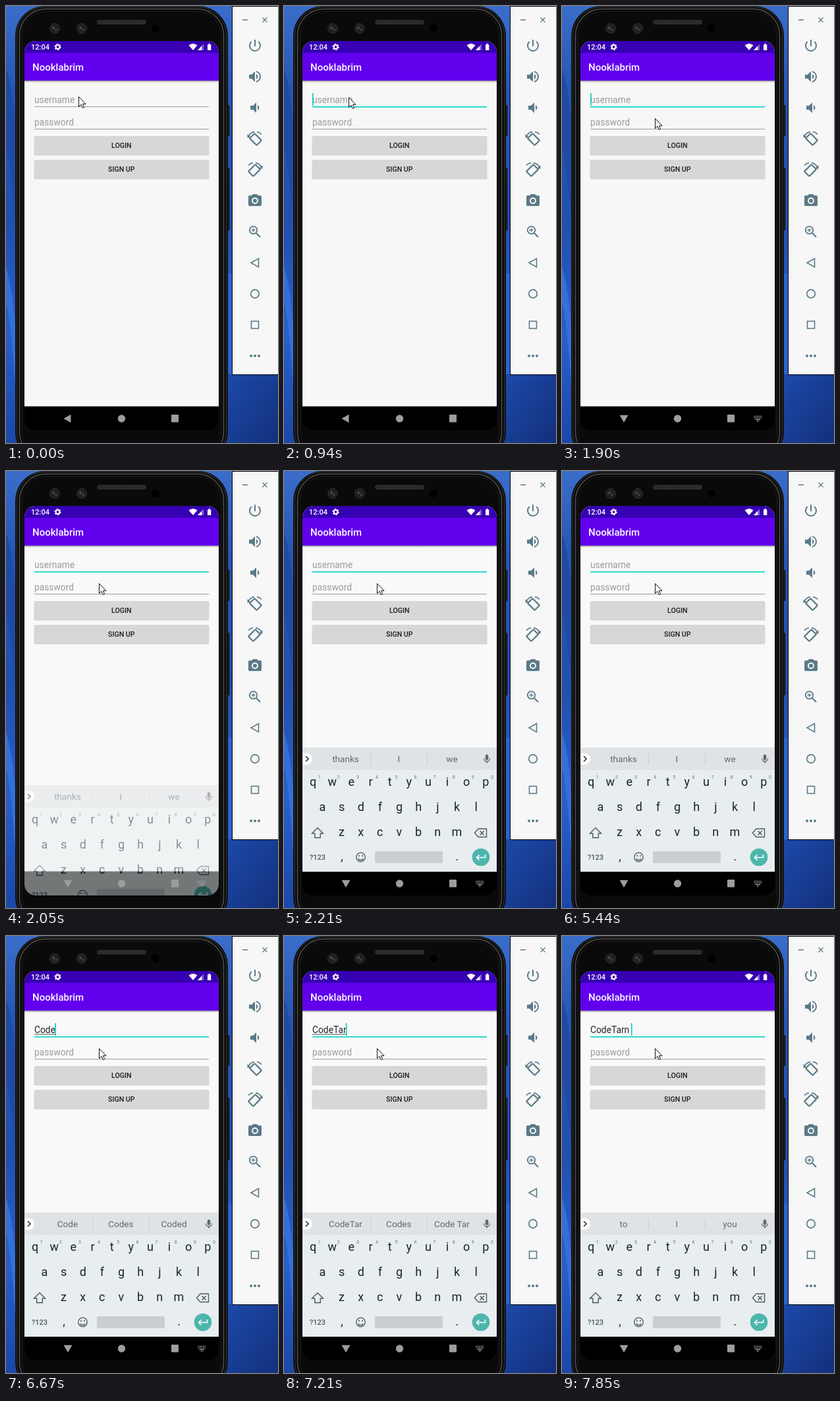
An HTML page for the animation above (8000 ms loop, 413 by 662 pixels).

```html
<!DOCTYPE html>
<html lang="en">
<head>
<meta charset="utf-8">
<title>Login screen</title>
<style>
html, body { margin: 0; width: 100%; height: 100%; overflow: hidden; background: #1c4aa8; }
svg { display: block; width: 413px; height: 662px; }
text { font-family: Roboto, Arial, sans-serif; white-space: pre; }
.mid { text-anchor: middle; }
.hint { font-size: 13.8px; fill: #9b9b9b; }
.btn { font-size: 10.6px; font-weight: 500; fill: #1c1c1c; text-anchor: middle; }
.key { font-size: 18px; fill: #14262e; text-anchor: middle; }
.num { font-size: 7px; fill: #6a777d; text-anchor: middle; }
.tip { font-size: 13.6px; fill: #5d696f; text-anchor: middle; }
.line { fill: none; stroke: #5b7a88; stroke-width: 2; }
</style>
</head>
<body>
<svg viewBox="0 0 413 662">
  <defs>
    <linearGradient id="sky" x1="0" y1="0" x2="0" y2="1">
      <stop offset="0" stop-color="#3a6dca"/><stop offset=".2" stop-color="#2755b0"/>
      <stop offset=".5" stop-color="#2250ae"/><stop offset=".75" stop-color="#295fca"/>
      <stop offset="1" stop-color="#1b48a8"/>
    </linearGradient>
    <linearGradient id="corner" x1="0" y1="0" x2="1" y2="1">
      <stop offset="0" stop-color="#1d4aa9"/><stop offset="1" stop-color="#132f7c"/>
    </linearGradient>
    <linearGradient id="drop" x1="0" y1="0" x2="0" y2="1">
      <stop offset="0" stop-color="#000" stop-opacity=".4"/><stop offset="1" stop-color="#000" stop-opacity="0"/>
    </linearGradient>
    <pattern id="mesh" width="3" height="3" patternUnits="userSpaceOnUse">
      <rect width="3" height="3" fill="#303030"/><circle cx="1.5" cy="1.5" r=".8" fill="#161616"/>
    </pattern>
    <clipPath id="screen"><rect x="28" y="53" width="295" height="590" rx="17"/></clipPath>
  </defs>

  <rect width="413" height="662" fill="url(#sky)"/>
  <path d="M0 95Q10 120 15 190V330Q8 250 0 215Z" fill="#1f4ba4"/>
  <path d="M0 395Q11 430 15 500V590Q8 480 0 450Z" fill="#356fd9"/>
  <rect x="336" y="405" width="8" height="154" fill="#2c63cf"/>
  <rect x="336" y="558" width="77" height="104" fill="url(#corner)"/>

  <g id="phone">
    <rect x="335" y="150" width="4.5" height="47" rx="1.5" fill="#1a1a1a"/>
    <rect x="335" y="245" width="4.5" height="95" rx="1.5" fill="#1a1a1a"/>
    <rect x="14.5" y=".5" width="322" height="690" rx="44" fill="#0a0a0a" stroke="#161616"/>
    <rect x="16.5" y="1.5" width="318" height="687" rx="43" fill="none" stroke="#383838"/>
    <rect x="20.5" y="4.5" width="310" height="681" rx="40" fill="#0a0a0a" stroke="#505050" stroke-width="1.500"/>
    <rect x="24.5" y="8.5" width="302" height="673" rx="36" fill="#0a0a0a" stroke="#1c1c1c"/>
    <rect x="138" y="21" width="75" height="7" rx="3.5" fill="url(#mesh)"/>
    <g fill="#202020" stroke="#2c2c2c"><circle cx="74" cy="34" r="7.5"/><circle cx="115" cy="34" r="7.5"/></g>
    <g fill="#4a4a4a"><circle cx="72" cy="33" r="2"/><circle cx="76" cy="36" r="1.5"/><circle cx="113" cy="33" r="2"/><circle cx="117" cy="36" r="1.5"/></g>
    <circle cx="227" cy="34" r="6" fill="#000"/>
  </g>

  <g clip-path="url(#screen)">
    <rect id="page" x="28" y="53" width="295" height="554"/>
    <rect x="28" y="113" width="295" height="3" fill="url(#drop)"/>
    <rect x="28" y="53" width="295" height="18" fill="#3700b3"/>
    <rect x="28" y="71" width="295" height="42" fill="#6200ee"/>
    <text x="38" y="66" font-size="11" font-weight="500" fill="#fff">12:04</text>
    <g fill="none" stroke="#fff"><circle cx="78.5" cy="62" r="2.9" stroke-width="2"/><circle cx="78.5" cy="62" r="4.3" stroke-width="1.6" stroke-dasharray="2.2 2.3"/></g>
    <g fill="#fff">
      <path d="M277.500 59.500Q284 54.500 290.500 59.500L284 67Z"/>
      <path d="M291 67L300 57.500V67Z" opacity=".4"/><path d="M291 67L297 60.700V67Z"/>
      <path d="M306 58.500H307.500V57H309.800V58.500H311.300V67H306Z"/>
    </g>
    <text x="40" y="98" font-size="15" font-weight="500" fill="#fff">Nooklabrim</text>

    <text id="hint" class="hint" x="43" y="147">username</text>
    <text id="typed" x="43" y="147" font-size="13.8" fill="#242424"></text>
    <rect id="mark" x="43" y="148.500" height="1" fill="#555"/>
    <rect id="rule" x="43" width="265"/>
    <rect id="caret" y="132" width="1.600" height="19" fill="#03cdb9"/>
    <text class="hint" x="43" y="181">password</text>
    <rect x="43" y="186" width="265" height="1" fill="#9d9d9d"/>
    <g id="buttons"></g>

    <rect x="28" y="606.500" width="295" height="37" fill="#000"/>
    <g id="board"></g>
    <g fill="#9d9d9d">
      <path id="back" d="M87.500 625L98.500 618.700V631.300Z"/>
      <path id="down" d="M87.500 619.700H100.500L94 631Z"/>
      <circle cx="175.500" cy="625" r="5.700"/>
      <rect x="251" y="619" width="11" height="11.500" rx="1"/>
      <g id="switch"><path d="M291.500 621.500H303M291.500 624H303" stroke="#9d9d9d" stroke-width="1.500" stroke-dasharray="1.500 1"/><path d="M293.500 626.500H301" stroke="#9d9d9d" stroke-width="1.300"/><path d="M295.500 628.500H299L297.250 630.500Z"/></g>
    </g>
  </g>

  <rect x="343.500" y=".5" width="80" height="558" fill="#f7f7f7" stroke="#000"/>
  <g class="line">
    <path d="M359 21H367M389.500 17.500L396.500 24.500M396.500 17.500L389.500 24.500" stroke-width="1.300"/>
    <g id="turn">
      <rect x="-5.300" y="-7.500" width="10.600" height="15" rx="1" transform="translate(379 202) rotate(-45)" stroke-width="2.200"/>
      <path d="M368.500 197A11 11 0 0 1 377 190.700M381 190.700A11 11 0 0 1 388 194.500" stroke-width="1.700"/>
      <path d="M366.500 194V199.500H372Z" fill="#5b7a88" stroke="none"/>
    </g>
    <use href="#turn" transform="translate(756 47) scale(-1 1)"/>
    <circle cx="375.500" cy="339.500" r="5.700" stroke-width="1.800"/><path d="M380 344L386 350" stroke-width="2.200"/><path d="M372.500 339.500H378.500M375.500 336.500V342.500" stroke-width="1.300"/>
    <path d="M372 389L383.500 382.500V395.500Z" stroke-width="1.600"/>
    <circle cx="378" cy="436" r="6.300" stroke-width="1.700"/>
    <rect x="372.500" y="477.500" width="11" height="11" stroke-width="1.600"/>
  </g>
  <g id="icons" fill="#5b7a88" fill-rule="evenodd">
    <path transform="translate(366 48)" d="M13 3h-2v10h2zM17.830 5.170l-1.420 1.420A6.920 6.920 0 0 1 19 12a7 7 0 1 1-11.420-5.420L6.170 5.170A8.930 8.930 0 0 0 3 12a9 9 0 0 0 18 0c0-2.740-1.230-5.180-3.170-6.830z"/>
    <path transform="translate(366 95)" d="M3 9v6h4l5 5V4L7 9zM16.500 12A4.500 4.500 0 0 0 14 7.970v8.050A4.500 4.500 0 0 0 16.500 12zM14 3.230v2.060a7 7 0 0 1 0 13.420v2.060a9 9 0 0 0 0-17.540z"/>
    <path transform="translate(366 142)" d="M18.500 12A4.500 4.500 0 0 0 16 7.970v8.050A4.500 4.500 0 0 0 18.500 12zM5 9v6h4l5 5V4L9 9z"/>
    <path transform="translate(366 283)" d="M9 2L7.170 4H4a2 2 0 0 0-2 2v12a2 2 0 0 0 2 2h16a2 2 0 0 0 2-2V6a2 2 0 0 0-2-2h-3.170L15 2zM12 17a5 5 0 1 1 0-10 5 5 0 0 1 0 10z"/>
    <circle cx="378" cy="295" r="3"/>
    <circle cx="372" cy="530" r="2"/><circle cx="378" cy="530" r="2"/><circle cx="384" cy="530" r="2"/>
  </g>

  <path id="mouse" d="M.5 .5V15.500L4 12.200L6.300 17.500L8.700 16.500L6.400 11.400H11Z" fill="#fff" stroke="#111"/>
</svg>

<script>
const $ = id => document.getElementById(id);
const text = (cls, x, y, s) => `<text class="${cls}" x="${x}" y="${y}">${s}</text>`;

$('buttons').innerHTML = [['LOGIN', 197], ['SIGN UP', 233]].map(([s, y]) =>
  `<rect x="42.500" y="${y + 1}" width="266" height="28.500" rx="2" fill="#000" opacity=".14"/>
   <rect x="43" y="${y}" width="265" height="28" rx="1.500" fill="#d6d7d7"/>` + text('btn', 175.3, y + 18, s)).join('');

const rows = [['qwertyuiop', 44, 477], ['asdfghjkl', 58.5, 515], ['zxcvbnm', 87.5, 553]];
const keys = rows.map(([s, x, y]) => [...s].map((c, i) => text('key', x + i * 29.15, y, c)).join('')).join('');
const nums = [...'1234567890'].map((c, i) => text('num', 53.6 + i * 29.15, 465.5, c)).join('');

$('board').innerHTML = `
  <rect x="28" y="419" width="295" height="188" fill="#e8edf0"/>
  <rect x="28" y="419" width="295" height="34" fill="#dfe3e6"/>
  <path d="M28 427.500H34A8.500 8.500 0 0 1 34 445H28Z" fill="#fff"/>
  <path d="M33 432L37 436L33 440" fill="none" stroke="#333" stroke-width="1.700"/>
  <path d="M131.500 428V445M217.500 428V445" stroke="#c8cdd0"/>
  ${[93.5, 174.3, 255].map(x => text('tip', x, 441, '')).join('')}
  <rect x="305.700" y="429.500" width="4.600" height="8.500" rx="2.300" fill="#5d696f"/>
  <path d="M303.500 435.500A4.500 4.500 0 0 0 312.500 435.500M308 440V443" fill="none" stroke="#5d696f" stroke-width="1.300"/>
  ${keys}${nums}
  <path id="shift" d="M51 540.500L59.500 549H55.300V555.500H46.700V549H42.500Z" stroke="#4b5960" stroke-width="1.400"/>
  <path d="M295 542H307.500V554.500H295L289.500 548.300ZM297.500 545.200L303.700 551.400M303.700 545.200L297.500 551.400" fill="none" stroke="#4b5960" stroke-width="1.400"/>
  <text class="mid" x="51" y="589" font-size="11" font-weight="500" fill="#4b5960">?123</text>
  ${text('key', 88, 590, ',')}${text('key', 262.5, 590, '.')}
  <g fill="none" stroke="#4b5960" stroke-width="1.300"><circle cx="116.500" cy="585" r="6.800"/><path d="M112.800 587A4 4 0 0 0 120.200 587"/></g>
  <circle cx="114" cy="583" r="1.100" fill="#4b5960"/><circle cx="119" cy="583" r="1.100" fill="#4b5960"/>
  <rect x="138" y="576" width="103" height="18" rx="2" fill="#c9ced2"/>
  <circle cx="299" cy="585" r="13.300" fill="#4db6ac"/>
  <path d="M305.500 581V585.500H293M296.500 581.500L292.500 585.500L296.500 589.500" fill="none" stroke="#fff" stroke-width="1.600"/>`;

// Each step changes only the listed values.
const steps = [
  [0, { x: 110, y: 137, paper: '#f7f7f7', focus: 0, caret: 0, nav: 0, slide: 0, alpha: 0, caps: 0, word: '', mark: 0, tips: 'thanks,I,we' }],
  [400, { focus: 1 }],
  [520, { caret: 1 }],
  [670, { x: 107 }],
  [790, { x: 102, y: 138 }],
  [940, { x: 98 }],
  [1500, { x: 122, y: 155 }],
  [1620, { x: 141, y: 170 }],
  [1780, { caret: 0 }],
  [1900, { caret: 1, nav: 1 }],
  [2050, { caret: 0, slide: 57, alpha: .5, paper: '#f9f9f9' }],
  [2210, { slide: 0, alpha: 1 }],
  [2510, { caret: 1 }],
  [2910, { caret: 0 }],
  [3470, { caret: 1 }],
  [3900, { caret: 0 }],
  [4490, { caret: 1 }],
  [5050, { caret: 0 }],
  [5320, { caps: 1 }],
  [5440, { caps: 0 }],
  [5560, { caret: 1, word: 'Co', mark: 1, tips: 'Co,Come,Could' }],
  [5710, { word: 'Code', tips: 'Code,Codes,Coded' }],
  [6240, { caret: 0 }],
  [6670, { caret: 1 }],
  [6950, { caps: 1 }],
  [7070, { caps: 0, word: 'CodeT', tips: 'CodeT,Codes,Coded' }],
  [7210, { word: 'CodeTar', tips: 'CodeTar,Codes,Code Tar' }],
  [7580, { word: 'CodeTarn', tips: 'CodeTarn,Codes,Coding' }],
  [7730, { word: 'CodeTarn ', mark: 0 }],
  [7850, { tips: 'to,I,you' }]
];

const pen = document.createElement('canvas').getContext('2d');
const tips = document.querySelectorAll('.tip');
const letters = [...document.querySelectorAll('.key')].slice(0, 26);
const alphabet = rows.map(r => r[0]).join('');
const set = (id, attrs) => { for (const k in attrs) $(id).setAttribute(k, attrs[k]); };
const show = (id, on) => set(id, { opacity: on ? 1 : 0 });

function draw(s) {
  pen.font = '13.8px Roboto, Arial, sans-serif';
  const width = pen.measureText(s.word).width;
  set('mouse', { transform: `translate(${s.x} ${s.y})` });
  set('page', { fill: s.paper });
  set('rule', s.focus ? { y: 152, height: 1.6, fill: '#03d3bf' } : { y: 152, height: 1, fill: '#9d9d9d' });
  set('caret', { x: 43 + (s.word ? width - .7 : 0) });
  show('caret', s.caret);
  show('hint', !s.word);
  $('typed').textContent = s.word;
  set('mark', { width });
  show('mark', s.mark);
  show('back', !s.nav);
  show('down', s.nav);
  show('switch', s.nav);
  set('board', { opacity: s.alpha, transform: `translate(0 ${s.slide})` });
  s.tips.split(',').forEach((w, i) => tips[i].textContent = w);
  letters.forEach((k, i) => k.textContent = s.caps ? alphabet[i].toUpperCase() : alphabet[i]);
  set('shift', { fill: s.caps ? '#4b5960' : 'none' });
}

const start = performance.now();
let last = -1;
function tick() {
  const t = (performance.now() - start) % 8000;
  const past = steps.filter(p => p[0] <= t);
  if (past.length !== last) {
    last = past.length;
    draw(Object.assign({}, ...past.map(p => p[1])));
  }
  requestAnimationFrame(tick);
}
tick();
</script>
</body>
</html>
```
